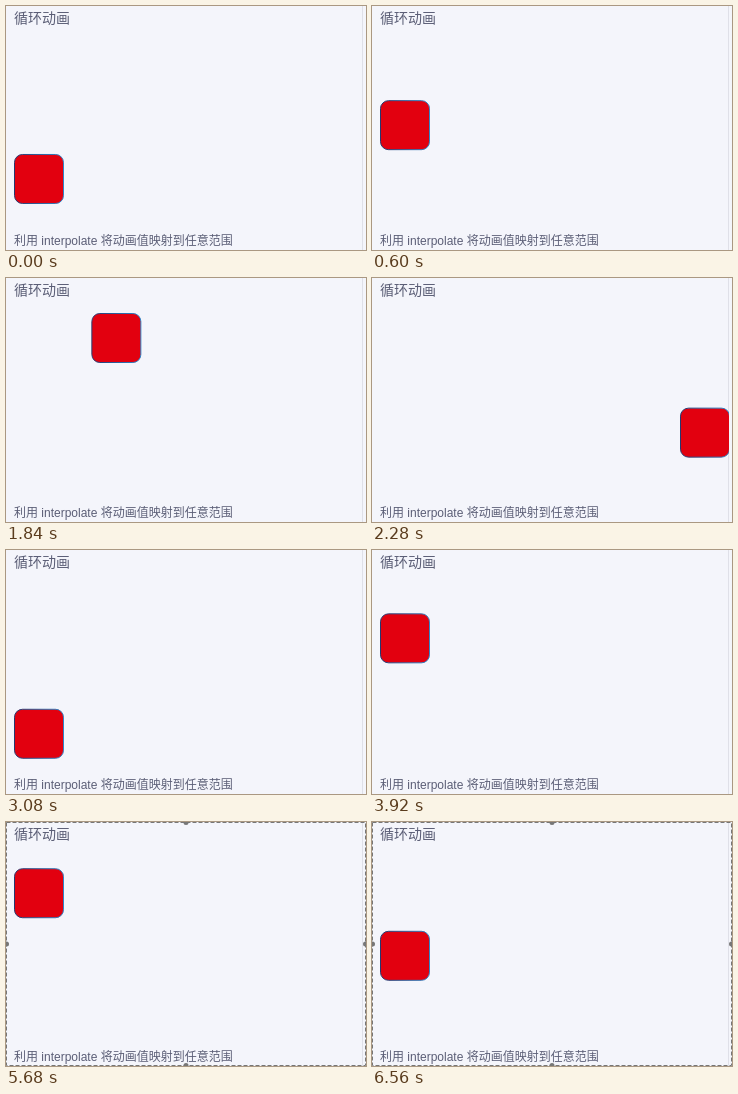
Animation, 360 px wide and 244 px high, one loop 6.6 s. Source, as an HTML page:

```html
<!DOCTYPE html>
<html lang="zh-CN">
<head>
<meta charset="utf-8">
<title>循环动画</title>
<style>
  html, body { margin: 0; width: 100%; height: 100%; overflow: hidden; background: #f4f5fb; }
  svg { display: block; width: 360px; height: 244px; }
  text { font-family: "Liberation Sans", "Noto Sans CJK SC", "Noto Sans CJK", sans-serif; fill: #5b5e76; }
</style>
</head>
<body>
<svg viewBox="0 0 360 244">
  <defs>
    <clipPath id="panel"><rect width="357" height="244"/></clipPath>
    <linearGradient id="rim">
      <stop offset="0" stop-color="#26386f"/>
      <stop offset="1" stop-color="#2f86c8"/>
    </linearGradient>
  </defs>
  <rect width="360" height="244" fill="#f4f5fb"/>
  <path d="M356.5 0V244" stroke="#dfe0e8"/>
  <text x="8" y="17" font-size="14">循环动画</text>
  <text x="8" y="239" font-size="12">利用 interpolate 将动画值映射到任意范围</text>
  <g clip-path="url(#panel)">
    <rect id="box" x=".5" y=".5" width="49" height="49" rx="8" fill="#e2000f" stroke="url(#rim)"/>
  </g>
  <g id="selection">
    <rect x=".5" y=".5" width="359" height="243" fill="none" stroke="#777" stroke-dasharray="4 2"/>
    <g fill="#777">
      <circle cx="180" cy="0.5" r="2.5"/>
      <circle cx="180" cy="243.5" r="2.5"/>
      <circle cx="0.5" cy="122" r="2.5"/>
      <circle cx="359.5" cy="122" r="2.5"/>
    </g>
  </g>
</svg>
<script>
  const LOOP = 6600;
  const LAP = 3002, LAP_TIME = 3000, LAP_START = 1564;
  const SELECTION_START = 4440;
  const corners = [[8, 35], [308, 35], [308, 165], [8, 165], [8, 35]];
  const box = document.getElementById('box');
  const selection = document.getElementById('selection');

  function bounce(t) {
    const k = 7.5625, d = 2.75;
    if (t < 1 / d) return k * t * t;
    if (t < 2 / d) return k * (t - 1.5 / d) ** 2 + 0.75;
    if (t < 2.5 / d) return k * (t - 2.25 / d) ** 2 + 0.9375;
    return k * (t - 2.625 / d) ** 2 + 0.984375;
  }

  // Each side of the rectangle takes a quarter of the eased value.
  function positionAt(value) {
    const side = Math.min(3, Math.floor(value * 4));
    const part = value * 4 - side;
    const [from, to] = [corners[side], corners[side + 1]];
    return from.map((start, axis) => start + (to[axis] - start) * part);
  }

  function render(time) {
    const elapsed = (time - LAP_START + LAP) % LAP;
    const [x, y] = positionAt(bounce(Math.min(1, elapsed / LAP_TIME)));
    box.setAttribute('transform', `translate(${x.toFixed(2)} ${y.toFixed(2)})`);
    selection.setAttribute('visibility', time >= SELECTION_START ? 'visible' : 'hidden');
  }

  const origin = performance.now();
  function tick() {
    render((performance.now() - origin) % LOOP);
    requestAnimationFrame(tick);
  }
  tick();
</script>
</body>
</html>
```
